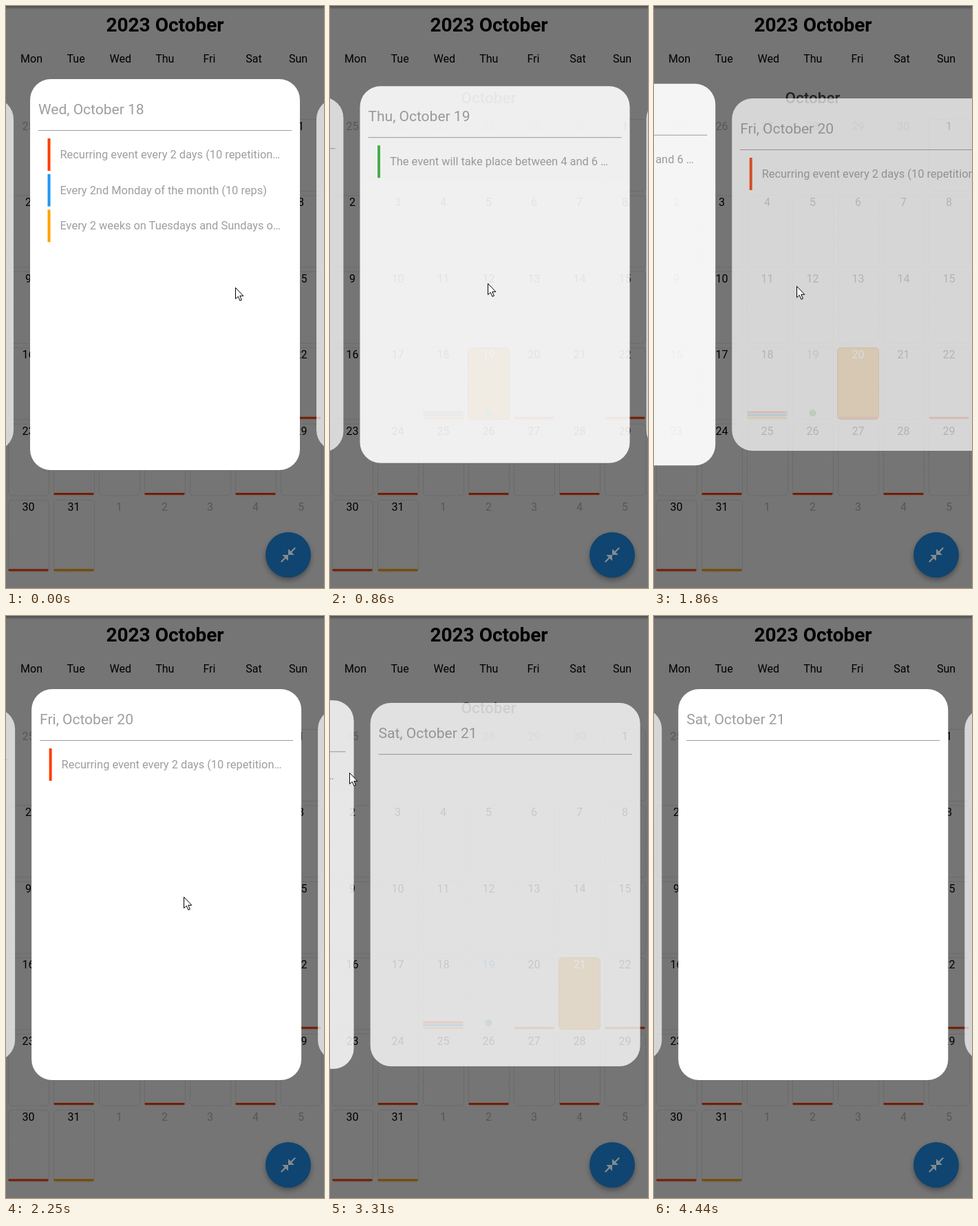
An HTML page that plays this animation: 462 by 844 pixels, repeating every 4500 ms.

```html
<!DOCTYPE html>
<html lang="en">
<head>
<meta charset="utf-8">
<title>Calendar day cards</title>
<style>
  html, body { margin: 0; width: 100%; height: 100%; overflow: hidden; background: #757575; }
  svg { display: block; width: 462px; height: 844px; font-family: Roboto, sans-serif; font-size: 16px; }
  .mid { text-anchor: middle; }
  .grid { fill: none; stroke: #000; stroke-opacity: .28; stroke-dasharray: 1 2; }
  .out { fill: #575757; }
  .title { font-size: 21px; fill: #9e9e9e; }
  .event { font-size: 16.4px; fill: #9e9e9e; }
</style>
</head>
<body>
<svg id="stage" viewBox="0 0 462 844"></svg>
<script>
const LOOP = 4500, STEP = 66.25, PITCH = 416;
const SWIPES = [674, 1807, 3196];   // moments when the next day becomes active
const RED = '#ff3d00', BLUE = '#2196f3', AMBER = '#ffa000', GREEN = '#43b548';
const REPEAT = [RED, 'Recurring event every 2 days (10 repetition…'];
const CARDS = [
  ['Tue', 17, []],
  ['Wed', 18, [REPEAT,
    [BLUE, 'Every 2nd Monday of the month (10 reps)'],
    [AMBER, 'Every 2 weeks on Tuesdays and Sundays o…']]],
  ['Thu', 19, [[GREEN, 'The event will take place between 4 and 6 …']]],
  ['Fri', 20, [REPEAT]],
  ['Sat', 21, []],
  ['Sun', 22, [REPEAT]]
];
// time, x, y of the pointer tip
const POINTER = [
  [0, 333, 408], [130, 333, 408], [520, 338, 406], [674, 234, 402], [860, 229, 402],
  [1590, 318, 408], [1660, 318, 408], [1810, 214, 406], [1860, 206, 406],
  [2250, 258, 408], [2650, 325, 290], [2850, 325, 290], [3060, 300, 262],
  [3196, 70, 232], [3310, 27, 226], [3850, 200, 420], [4380, 368, 704]
];

const clamp = v => Math.max(0, Math.min(1, v));
const colX = c => 32.5 + 66 * c;
const rowY = r => 164 + 110.4 * r;

// A colour as seen under the dark veil that covers the month.
function dim(hex) {
  const part = i => Math.round(parseInt(hex.substr(i, 2), 16) * .46);
  return `rgb(${part(1)},${part(3)},${part(5)})`;
}

function monthGrid() {
  let s = '';
  ['Mon', 'Tue', 'Wed', 'Thu', 'Fri', 'Sat', 'Sun'].forEach((d, i) => {
    s += `<text class="mid" x="${37 + 64.6 * i}" y="82">${d}</text>`;
  });
  for (let i = 0; i < 42; i++) {
    const c = i % 7, r = Math.floor(i / 7), n = i - 5;
    const inside = n > 0 && n < 32;
    const label = n < 1 ? n + 30 : n > 31 ? n - 31 : n;
    const x = colX(c), y = rowY(r);
    if (inside) s += `<rect class="grid" x="${x - 29}" y="${y + .5}" width="59" height="104" rx="5"/>`;
    s += `<text class="mid ${inside ? '' : 'out'}" id="d${i}" x="${x}" y="${y + 16}">${label}</text>`;
    const bars = n === 18 ? [RED, BLUE, AMBER] : n === 31 ? [AMBER]
      : n >= 20 && n <= 30 && n % 2 === 0 ? [RED] : [];
    bars.forEach((color, k) => {
      s += `<rect x="${x - 29}" y="${y + 100.5 - 4 * (bars.length - 1 - k)}" width="58" height="3"
        rx="1" fill="${dim(color)}"/>`;
    });
    if (n === 19) s += `<circle cx="${x}" cy="${y + 95}" r="5" fill="${dim(GREEN)}"/>`;
  }
  return s;
}

function card([day, num, events]) {
  const rows = events.map(([color, text], i) =>
    `<rect x="25.5" y="${86 + 51.7 * i}" width="4" height="47" fill="${color}"/>
     <text class="event" x="43.5" y="${115 + 51.7 * i}">${text}</text>`).join('');
  return `<g class="card"><rect width="392" rx="30" fill="#fff"/>
    <text class="title" x="12" y="51">${day}, October ${num}</text>
    <rect x="12" y="74" width="368" height="1" fill="#9e9e9e"/>${rows}</g>`;
}

const stage = document.getElementById('stage');
stage.innerHTML = `
  <defs>
    <linearGradient id="edge" x2="0" y2="1">
      <stop stop-color="#000" stop-opacity=".35"/><stop offset="1" stop-color="#000" stop-opacity="0"/>
    </linearGradient>
    <filter id="blur" x="-30%" y="-30%" width="160%" height="160%"><feGaussianBlur stdDeviation="4"/></filter>
  </defs>
  <rect width="462" height="844" fill="#757575"/>
  <rect width="462" height="5" fill="url(#edge)"/>
  <text class="mid" x="231" y="37" font-size="28" font-weight="700">2023 October</text>
  <text class="mid" x="230.5" y="141" font-size="22.5" font-weight="500" fill="#202020">October</text>
  <rect id="cell" y="495.5" width="60" height="104" rx="5" fill="${dim('#ff9800')}" stroke="#5c2c00"/>
  ${monthGrid()}
  <circle cx="410" cy="800" r="32" opacity=".4" filter="url(#blur)"/>
  <circle cx="410" cy="796" r="33" fill="${dim(BLUE)}"/>
  <path transform="translate(396.8 782.8) scale(1.1)" fill="#858b90"
    d="M22 3.41 16.71 8.7 20 12h-8V4l3.29 3.29L20.59 2zM3.41 22l5.29-5.29L12 20v-8H4l3.29 3.29L2 20.59z"/>
  ${CARDS.map(card).join('')}
  <path id="pointer" d="M.5.5v16.2l3.8-3.4 2.6 6 2.5-1.1-2.6-5.8h5z" fill="#fff" stroke="#000"/>`;

const cards = [...stage.querySelectorAll('.card')];
const cell = document.getElementById('cell');
const pointer = document.getElementById('pointer');
const dayLabels = [18, 19, 20, 21].map(n => document.getElementById('d' + (n + 5)));
const dayColors = ['#000', dim(BLUE), '#000', '#000'];

// Drag accelerates past half a page, then the page snaps with a slow tail.
function swipe(t) {
  if (t < 0) return 224 * clamp(1 + t / 130) ** 2;
  return PITCH - 186 * Math.exp(-t / 51) - 6 * Math.exp(-t / 400);
}

function focus(i, t) {
  const enter = i === 1 ? 1 : i > 1 && i < 5 ? clamp((t - SWIPES[i - 2] - 60) / 200) : 0;
  const leave = i > 0 && i < 4 ? clamp((t - SWIPES[i - 1]) / 200) : 0;
  return enter - leave;
}

function pointerAt(t) {
  const i = POINTER.findIndex(p => p[0] > t);
  if (i < 0) return POINTER[POINTER.length - 1].slice(1);
  const a = POINTER[i - 1], b = POINTER[i], k = (t - a[0]) / (b[0] - a[0]);
  return [a[1] + (b[1] - a[1]) * k, a[2] + (b[2] - a[2]) * k];
}

function draw(now) {
  const t = Math.floor((now % LOOP + 4) / STEP) * STEP;
  const scroll = SWIPES.reduce((sum, s) => sum + swipe(t - s), 0);
  const active = SWIPES.filter(s => t >= s).length;

  cards.forEach((g, i) => {
    const f = focus(i, t), gap = 28 * (1 - f);
    const x = 35 + PITCH * (i - 1) - scroll;
    g.setAttribute('transform', `translate(${x.toFixed(1)} ${(106 + gap).toFixed(2)})`);
    g.setAttribute('opacity', .7 + .3 * f);
    g.firstChild.setAttribute('height', 567 - 2 * gap);
  });

  cell.setAttribute('x', colX(active + 2) - 30);
  dayLabels.forEach((d, i) => d.setAttribute('fill', i === active ? '#8a8a8a' : dayColors[i]));

  const [px, py] = pointerAt(t);
  pointer.setAttribute('transform', `translate(${Math.round(px)} ${Math.round(py)})`);
  pointer.setAttribute('visibility', t > 4430 ? 'hidden' : 'visible');
}

const start = performance.now();
function tick() {
  draw(performance.now() - start);
  requestAnimationFrame(tick);
}
tick();
</script>
</body>
</html>
```
